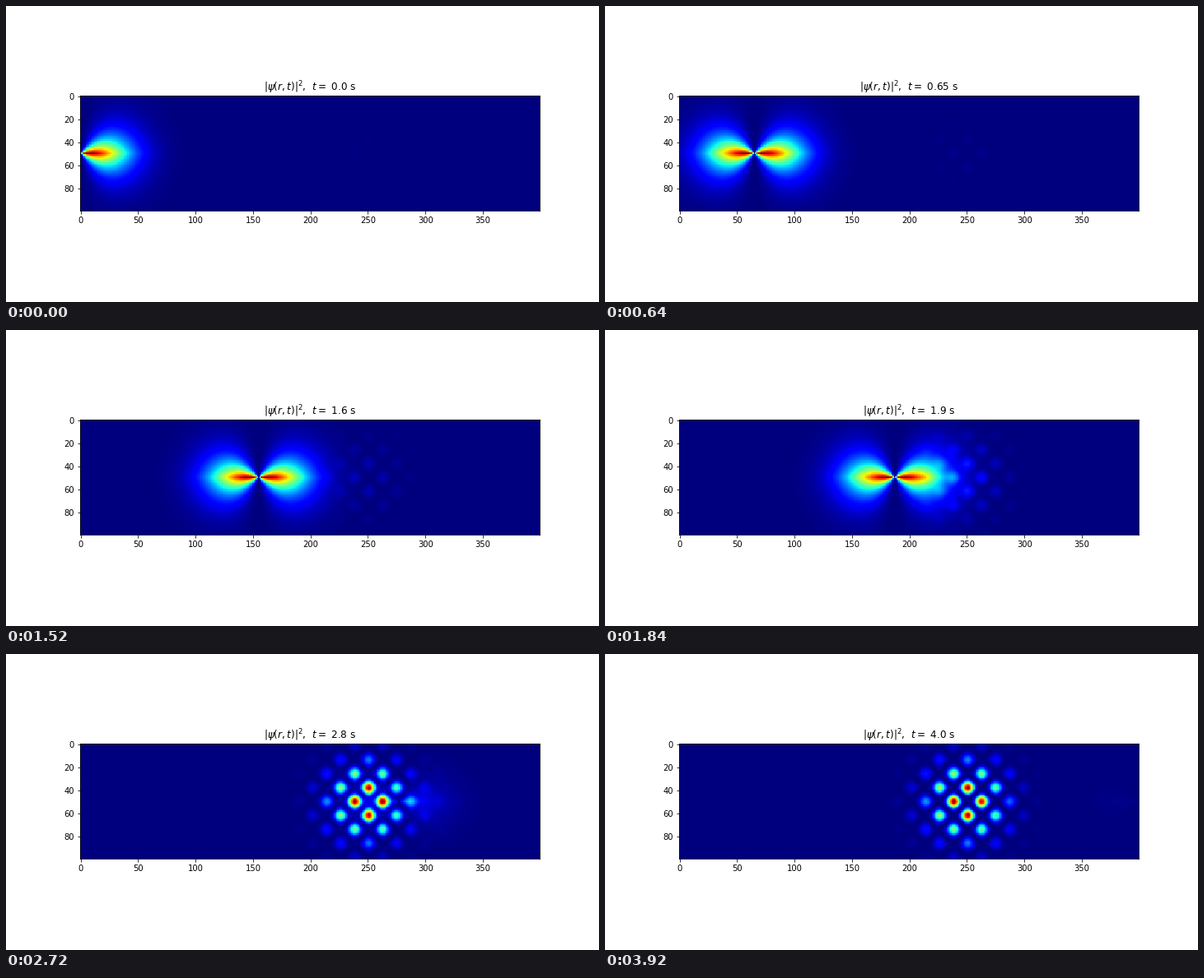
A matplotlib script for the animation above (4 s loop, 720 by 360 pixels).

```python
import matplotlib.pyplot as plt
import numpy as np
from matplotlib.animation import FuncAnimation

FRAMES = 50
T_END = 4.0
SPEED = 100.0        # packet velocity, units per second
K = 0.25             # lattice wave number
TRAP = (250.0, 50.0)
MID_Y = 50.0

plt.rcParams.update({
    "font.family": "DejaVu Sans",
    "font.size": 10,
    "mathtext.fontset": "dejavusans",
})

x, y = np.meshgrid(np.linspace(0, 400, 400), np.linspace(0, 100, 100))


def lattice():
    r2 = (x - TRAP[0]) ** 2 + (y - TRAP[1]) ** 2
    waves = np.sin(K * (x + y) / 2) * np.sin(K * (x - y) / 2)
    rho = waves**2 * np.exp(-r2 / 900)
    return rho / rho.max()


def packet(cx):
    """Two-lobed travelling packet with a node on its vertical axis."""
    dx, dy = x - cx, y - MID_Y
    angle = np.arctan2(np.abs(dy), np.abs(dx))
    lobes = (1 - 2 * angle / np.pi) ** 2
    return lobes * np.exp(-(dx**2 + dy**2) / 1420) / 0.88


def mix(cx):
    """Share of the lattice state as the packet crosses the trap."""
    d = (cx - TRAP[0] + 14) / 36
    return (1 + d / np.hypot(d, 1)) / 2


LATTICE = lattice()


def density(t):
    cx = SPEED * t
    share = mix(cx)
    rho = (1 - share) * packet(cx) + share * LATTICE
    return rho / rho.max()


def label(t):
    return rf"$|\psi(r,t)|^2$,  $t=$ {t:.2} s"


fig = plt.figure(figsize=(10, 5), dpi=72, facecolor="white")
ax = fig.add_axes([0.125, 0.125, 0.775, 0.755])
image = ax.imshow(density(0.0), cmap="jet", vmin=0, vmax=1,
                  interpolation="nearest")
ax.set_xticks(range(0, 400, 50))
ax.set_yticks(range(0, 100, 20))
title = ax.set_title(label(0.0), fontsize=12)


def update(i):
    t = T_END * i / (FRAMES - 1)
    image.set_data(density(t))
    title.set_text(label(t))
    return image, title


anim = FuncAnimation(fig, update, frames=FRAMES, interval=80,
                     repeat=True, repeat_delay=0, blit=False)
plt.show()
```
